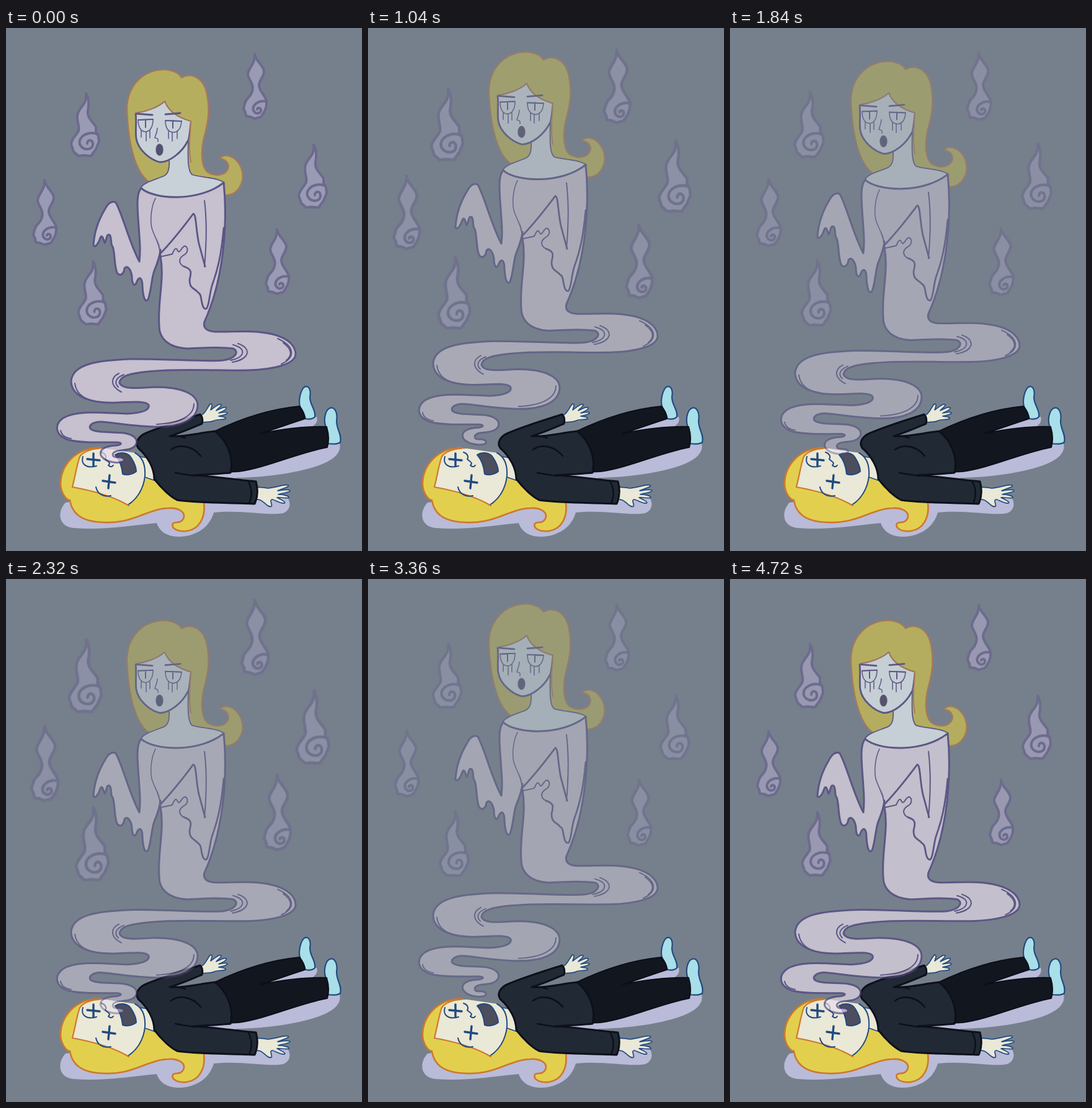
Animation, 574 px wide and 842 px high, one loop 4.8 s. Source, as an HTML page:

```html
<!DOCTYPE html>
<html lang="en">
<head>
<meta charset="utf-8">
<title>Out of body</title>
<style>
  html, body { margin: 0; width: 100%; height: 100%; overflow: hidden; background: #76808c; }
  svg { display: block; width: 574px; height: 842px; }
  path, ellipse { stroke-linejoin: round; stroke-linecap: round; }
  .line { fill: none; }
  .shadow { fill: #b9bbd8; }
  .pants { fill: #12161e; stroke: #0c0e18; stroke-width: 2; }
  .coat { fill: #212a34; stroke: #0d101b; stroke-width: 3; }
  .fold { fill: none; stroke: #0d101b; stroke-width: 2.6; }
  .sock { fill: #a9dfe8; stroke: #204a80; stroke-width: 2.2; }
  .skin { fill: #eae8d7; stroke: #204a80; stroke-width: 1.7; }
  .face { fill: #eae8d7; }
  .ink { fill: none; stroke: #204a80; stroke-width: 2; }
  .cross { fill: none; stroke: #204a80; stroke-width: 3.4; }
  .hair { fill: #e3cf4e; stroke: #cd782f; stroke-width: 2.6; }
  .fringe { fill: none; stroke: #cd782f; stroke-width: 2.2; }
  .mouth { fill: #4c4d5d; stroke: #204a80; stroke-width: 2; }
  #ghost { stroke: #504482; }
  #ghost .locks { fill: #d2c24c; stroke: #be7646; stroke-width: 2.2; }
  #ghost .bangs { fill: none; stroke: #be7646; stroke-width: 1.8; }
  #ghost .pale { fill: #ecf4f8; stroke-width: 1.8; }
  #ghost .dress { fill: #e8dceb; stroke-width: 3; }
  #ghost .fine { fill: none; stroke-width: 1.5; }
  #ghost .mid { fill: none; stroke-width: 2; }
  #ghost .bold { fill: none; stroke-width: 2.8; }
  #ghost .gasp { fill: #443f57; stroke-width: 1.4; }
  #flames { fill: #a9a5c4; stroke: #6a618f; stroke-width: 4; }
</style>
</head>
<body>
<svg viewBox="0 0 574 842">
  <defs>
    <g id="thin">
      <path d="M-1 -53C0 -42 14 -34 14 -25C14 -16 5 -10 6 -2C7 7 15 13 18 22C19 33 15 40 9 48L-1 51L-8 48L-15 47L-16 41L-19 35C-17 28 -17 22 -11 17C-6 12 -3 4 -5 -3C-7 -10 -12 -15 -12 -21C-11 -31 0 -37 -1 -53Z"/>
      <path class="line" d="M17 23C5 21 -6 29 -3 38C1 45 10 43 9 36C7 32 3 34 3 36"/>
    </g>
    <g id="fat">
      <path d="M2 -51C7 -42 7 -33 5 -23C3 -12 13 -5 18 3L18 11L22 18L23 27L18 39L10 50L-2 49L-10 50L-18 43L-22 31C-21 21 -13 17 -10 9C-8 0 -15 -9 -11 -19C-7 -30 4 -34 2 -51Z"/>
      <path class="line" d="M21 15C6 9 -11 18 -8 31C-4 42 14 42 13 30C12 23 4 23 4 30"/>
    </g>
  </defs>
  <rect width="574" height="842" fill="#76808c"/>

  <g id="body">
    <path class="shadow" d="M96 764C82 779 84 803 110 805C155 809 200 801 243 797C249 815 268 822 290 818C317 813 330 797 335 780C380 775 425 786 447 781C459 776 459 765 455 758L400 738L370 724C430 724 505 711 528 692C539 683 540 674 537 667L440 660L482 647C497 642 504 635 501 626L460 625L340 690L240 745Z"/>
    <path class="sock" d="M474 609C471 600 475 583 481 578C489 574 492 584 490 594C490 608 500 614 498 626C494 630 488 630 483 629Z"/>
    <path class="sock" d="M516 643C511 631 515 615 522 612C531 609 535 621 533 633C533 647 542 654 539 667C533 671 525 670 518 669Z"/>
    <path class="pants" d="M335 650C372 632 420 614 473 609C478 615 482 622 482 629C460 636 435 645 410 653C445 646 485 641 517 642C520 652 521 665 518 675C470 684 420 708 375 714L335 716Z"/>
    <path class="skin" d="M314 624C323 620 324 610 330 605C334 605 331 612 330 615C336 611 343 604 347 606C348 609 341 613 339 616C345 613 352 609 355 611C357 614 347 618 343 620C349 619 357 617 357 620C355 623 347 624 343 625C349 626 355 626 354 629C348 632 341 629 336 632C330 635 324 634 318 635Z"/>
    <path class="skin" d="M391 741C403 739 414 739 422 741C435 740 449 734 455 736C458 739 444 742 438 745C446 744 457 742 458 745C457 748 444 749 439 751C446 751 457 753 456 756C452 758 441 755 437 756C443 759 452 763 449 765C442 766 435 760 429 759C424 760 430 767 428 770C423 773 417 763 410 760C403 758 397 758 391 757Z"/>
    <path class="hair" d="M150 676C112 676 88 704 88 735C89 750 98 760 103 760C106 780 120 792 145 795C205 802 224 774 262 773C281 772 290 781 286 790C281 799 272 794 269 798C266 806 277 811 291 810C312 807 322 788 319 764L290 745L240 715L210 700Z"/>
    <path class="skin" d="M216 690L240 694L244 730L221 722Z"/>
    <path class="coat" d="M213 676C207 667 214 657 226 652C254 640 285 631 313 622C316 625 318 629 316 637C302 643 284 651 264 657C286 659 310 652 337 649C355 663 368 690 362 716C342 718 320 719 302 720C340 722 374 728 403 730C406 741 406 755 401 766C365 764 308 765 276 760C261 752 250 740 239 726C239 709 229 690 213 676Z"/>
    <path class="fold" d="M266 679C278 670 299 671 314 689M264 657C274 655 282 658 289 660M273 716C284 718 294 720 306 721M391 731C397 742 397 755 392 765"/>
    <path class="face" d="M107 739C112 720 114 704 119 690C129 681 145 677 160 677L208 684C221 691 225 705 224 721C222 742 211 759 196 768C170 753 140 745 107 739Z"/>
    <path class="ink" d="M208 684C221 691 225 705 224 721C222 742 211 759 196 768"/>
    <path class="fringe" d="M150 677C135 678 124 683 119 690C114 704 112 720 107 739C140 745 172 753 198 769"/>
    <path class="mouth" d="M176 687C184 682 197 683 202 692C207 700 210 709 210 714C202 720 193 720 188 718C187 707 184 696 176 687Z"/>
    <path class="cross" d="M141 685L141 705M131 694L151 696M167 720L165 741M156 729L176 732"/>
    <path class="ink" d="M124 690C120 702 130 710 146 705M145 739C147 749 156 756 169 753M154 683C160 685 163 690 160 694C164 698 170 700 165 704C168 707 171 707 173 704"/>
  </g>

  <g id="flames"></g>

  <g id="ghost">
    <path class="locks" d="M231 248C207 231 197 183 195 130C196 92 221 68 255 67C270 68 278 72 283 80C299 71 319 80 324 107C330 137 324 158 318 181C313 207 317 226 325 232C334 238 345 238 352 234C364 225 359 212 345 210C352 202 370 204 379 225C387 247 374 269 354 269L290 262Z"/>
    <path class="pale" d="M263 210C264 226 262 234 255 238C241 244 226 247 218 256L230 275L320 278L352 249C340 240 315 241 300 236C293 230 293 212 294 178Z"/>
    <path class="pale" d="M209 137C225 135 245 128 256 118C262 135 280 145 298 150C296 163 296 174 293 182C284 200 264 216 248 216C232 212 213 196 210 178C208 165 211 152 209 137Z"/>
    <path class="bold" d="M209 138C211 153 208 165 210 178C213 196 232 212 248 216C264 216 284 200 293 182"/>
    <path class="bangs" d="M209 137C225 135 245 128 256 118C262 135 280 145 298 150C297 175 294 194 298 216"/>

    <path class="dress" d="M218 258C240 277 312 280 351 249C355 287 353 330 350 358C344 410 331 449 320 473C317 484 325 489 340 489C375 489 400 486 430 493C458 500 467 514 467 525C466 542 430 550 390 551C330 552 280 548 230 553C200 556 184 560 183 571C186 582 210 580 240 578C285 578 309 590 309 608C308 632 280 642 245 642C210 642 180 636 155 634C140 633 133 640 136 645C142 652 170 650 190 652C208 655 213 663 210 670C205 680 190 679 179 681C169 684 171 691 179 691C188 690 193 694 189 698C178 702 158 698 153 688C150 678 160 673 178 672C186 671 188 668 180 667C150 667 120 668 100 663C78 655 78 638 92 628C115 614 160 620 195 621C222 620 232 614 230 607C226 600 205 602 180 603C140 605 105 595 105 568C108 540 150 535 200 533C260 532 320 538 350 535C372 532 376 520 366 516C340 512 310 516 290 516C262 514 247 500 247 480C244 440 256 405 249 367C248 349 241 339 236 325"/>
    <path class="dress" d="M218 258C208 268 213 300 215 335C217 356 216 367 215 376C198 344 188 300 177 281C171 277 164 283 160 291C149 309 142 331 141 350C144 355 150 345 152 338C155 331 157 340 159 346C163 341 161 331 167 333C171 336 168 349 172 352C176 362 174 381 179 394C184 401 190 396 191 387C195 381 201 388 203 399C203 414 208 418 211 408C215 399 220 402 220 416C221 433 224 443 229 437C234 425 235 400 239 391C244 379 248 368 249 357"/>
    <path class="fine" d="M241 274C233 290 232 314 236 325C241 339 248 349 249 367"/>
    <path class="bold" d="M250 362C270 341 290 315 302 299C307 300 306 325 311 347L321 384"/>
    <path class="mid" d="M250 368L268 364C271 357 274 351 277 359C281 364 283 351 289 351C294 354 294 362 286 366C277 372 279 380 287 384"/>
    <path class="bold" d="M287 384C300 388 299 394 296 405C296 419 302 418 308 424C311 428 312 425 314 432C316 443 317 453 323 452C328 448 328 425 333 412C341 390 347 367 351 322"/>
    <path class="mid" d="M320 278C324 310 323 350 320 384"/>

    <path class="mid" d="M182 556C168 563 168 577 186 586M190 558C177 563 174 571 181 578M111 572C113 588 124 596 139 600M374 508C396 515 394 533 365 538M366 510C388 516 386 530 362 535M438 500C465 512 468 530 444 541M447 507C461 517 462 527 452 535M303 605C303 625 280 636 243 638M88 648C90 657 97 660 105 661"/>

    <path class="bold" d="M211 138L236 140M257 139L281 137"/>
    <path class="fine" d="M213 148L237 147C237 161 231 167 225 167C218 167 213 160 213 148ZM257 149L283 150C282 163 276 168 269 168C262 167 257 161 257 149Z"/>
    <path class="mid" d="M213 148L237 147M257 149L283 150M225 148L225 160M269 149L269 161"/>
    <path class="fine" d="M218 165L218 176M226 168L226 182M232 165L232 177M262 166L262 178M268 168L268 182M276 166L276 178M244 161C244 169 240 174 240 177C244 177 246 179 245 183"/>
    <ellipse class="gasp" cx="247.5" cy="196" rx="5.5" ry="9"/>
  </g>
</svg>
<script>
  const LOOP = 4800, STEP = 80;
  const ghost = document.getElementById('ghost');
  const flames = document.getElementById('flames');
  const spots = [
    ['thin', 402, 95], ['thin', 63, 298], ['thin', 438, 377],
    ['fat', 127, 156], ['fat', 494, 239], ['fat', 138.5, 427]
  ];
  const fade = [
    [0, .7], [640, .51], [1280, .41], [1440, .4],
    [2400, .44], [3360, .4], [4080, .55], [4800, .7]
  ];

  const wisps = spots.map(([shape, x, y]) => {
    const el = document.createElementNS('http://www.w3.org/2000/svg', 'use');
    el.setAttribute('href', '#' + shape);
    flames.append(el);
    return { el, x, y };
  });

  // 0 at the ends of each period, 1 in the middle
  const wave = (t, period) => (1 - Math.cos(2 * Math.PI * t / period)) / 2;

  function lerpTable(table, t) {
    const i = table.findIndex(p => p[0] > t);
    const [t0, a] = table[i - 1], [t1, b] = table[i];
    return a + (b - a) * (t - t0) / (t1 - t0);
  }

  function draw(ms) {
    const t = Math.floor(ms % LOOP / STEP) * STEP;
    const alpha = lerpTable(fade, t);
    const scale = 1 + .16 * wave(t, 1600);
    ghost.setAttribute('transform', `translate(0 ${-30 * wave(t, 2400)})`);
    ghost.setAttribute('opacity', alpha);
    flames.setAttribute('opacity', alpha);
    for (const { el, x, y } of wisps)
      el.setAttribute('transform', `translate(${x} ${y}) scale(${scale})`);
  }

  const start = performance.now();
  function tick() {
    draw(performance.now() - start);
    requestAnimationFrame(tick);
  }
  tick();
</script>
</body>
</html>
```
